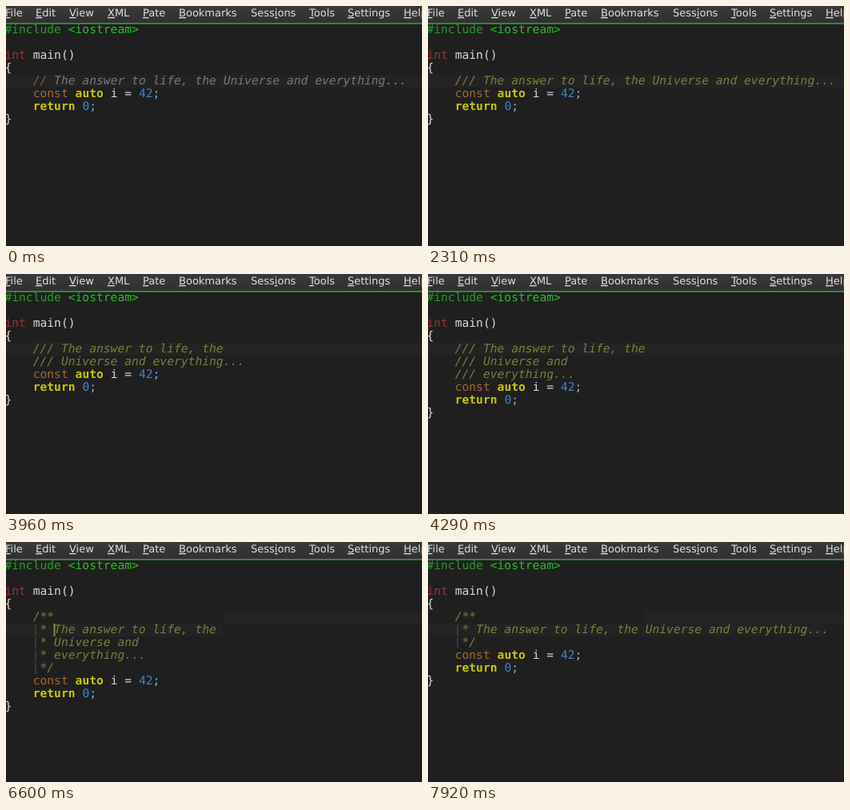
Animation, 520 px wide and 300 px high, one loop 8 s. Source, as an HTML page:

```html
<!DOCTYPE html>
<html lang="en">
<head>
<meta charset="utf-8">
<title>Comment reflow in an editor</title>
<style>
html, body { margin: 0; width: 520px; height: 300px; overflow: hidden; background: #1f1f1f; }
svg { display: block; }
text { white-space: pre; text-rendering: geometricPrecision; }
.menu { font: 13px "DejaVu Sans", sans-serif; fill: #dedede; }
.menu .key { text-decoration: underline; }
.code { font: 14.65px "DejaVu Sans Mono", monospace; fill: #d8d8d8; }
.directive { fill: #299a29; }
.header { fill: #2bbd2b; }
.type { fill: #a03030; }
.qualifier { fill: #a5662c; }
.keyword { fill: #c6c600; font-weight: bold; }
.number { fill: #4383c4; }
.symbol { fill: #78b4ec; }
.comment { fill: #787878; font-style: italic; }
.opener { fill: #80643f; font-style: italic; }
.doc { fill: #7b7e3c; font-style: italic; }
</style>
</head>
<body>
<svg width="520" height="300" viewBox="0 0 520 300">
  <defs>
    <linearGradient id="bar" x2="0" y2="1">
      <stop stop-color="#393939"/>
      <stop offset="1" stop-color="#303030"/>
    </linearGradient>
  </defs>
  <rect width="520" height="300" fill="#1f1f1f"/>
  <rect width="520" height="21" fill="url(#bar)"/>
  <rect y="21" width="520" height="1" fill="#36913a"/>
  <rect y="22" width="520" height="1" fill="#2d7a33"/>
  <g id="menu" class="menu"></g>
  <g id="marks"></g>
  <g id="code" class="code"></g>
</svg>
<script>
const LOOP = 8000, LINE = 16, TOP = 22, LEFT = -1.6;
const FIRST = 4; // line where the comment starts
const $ = id => document.getElementById(id);
const lineTop = n => TOP + n * LINE;
const escapeText = s => s.replace(/&/g, '&amp;').replace(/</g, '&lt;');
const span = (cls, s) => `<tspan class="${cls}">${escapeText(s)}</tspan>`;
const rect = (x, y, w, h, fill) =>
  `<rect x="${x}" y="${y}" width="${w}" height="${h}" fill="${fill}"/>`;

// "_" precedes the shortcut letter
const menu = [[-1, '_File'], [37, '_Edit'], [79, '_View'], [127, '_XML'], [171, '_Pate'],
  [216, '_Bookmarks'], [306, 'Sess_ions'], [379, '_Tools'], [427, '_Settings'], [497, '_Help']];
$('menu').innerHTML = menu.map(([x, label]) =>
  `<text x="${x}" y="13">${label.replace(/_(.)/, '<tspan class="key">$1</tspan>')}</text>`).join('');

const head = [span('directive', '#include ') + span('header', '<iostream>'), '',
  span('type', 'int') + ' main()', '{'];
const tail = [
  '    ' + span('qualifier', 'const') + ' ' + span('keyword', 'auto') + ' i = ' +
    span('number', '42') + span('symbol', ';'),
  '    ' + span('keyword', 'return') + ' ' + span('number', '0') + span('symbol', ';'),
  '}'];

const phrase = 'The answer to life, the Universe and everything...';
// Breaks the phrase before each given word
const wrap = (...words) =>
  words.reduce((s, w) => s.replace(' ' + w, '\n' + w), phrase).split('\n');
const doc = s => span('doc', s);
const slashes = (...words) => wrap(...words).map(s => doc('/// ' + s));
const block = (...words) => ['/**', ...wrap(...words).map(s => ' * ' + s), ' */'].map(doc);

// reach: how far the current-line band has been repainted in block style
const steps = [
  { at: 0, lines: [span('opener', '//') + span('comment', ' ' + phrase)] },
  { at: 990, lines: slashes() },
  { at: 2970, lines: slashes('everything') },
  { at: 3300, lines: slashes('and') },
  { at: 3960, lines: slashes('Universe') },
  { at: 4290, lines: slashes('Universe', 'everything') },
  { at: 5610, lines: block('Universe', 'everything'), reach: 271 },
  { at: 6930, lines: block('and'), reach: 342 },
  { at: 7260, lines: block('everything'), reach: 378 },
  { at: 7920, lines: block(), reach: 497 }
];
const carets = [
  { from: 660, to: 990, x: 50.5, line: 4, fill: '#858585' },
  { from: 990, to: 1320, x: 59.5, line: 4, fill: '#898c45' },
  { from: 1980, to: 2310, x: 59.5, line: 4, fill: '#898c45' },
  { from: 5610, to: 5940, x: 59.5, line: 5, fill: '#898c45' },
  { from: 6600, to: 6930, x: 59.5, line: 5, fill: '#898c45' }
];

function drawCode({ lines }) {
  const comment = lines.map(s => '    ' + s);
  $('code').innerHTML = [...head, ...comment, ...tail].map((s, n) =>
    `<text x="${LEFT}" y="${lineTop(n) + 12}">${s}</text>`).join('');
}

function drawMarks({ lines, reach }, caret) {
  const band = '#232323', y = lineTop(FIRST);
  let marks;
  if (reach) {
    marks = rect(0, y, 520, 1, band) + rect(271, y, 249, LINE, band) +
      rect(0, y + LINE, reach, LINE, band);
    for (let n = 1; n < lines.length; n++)
      marks += rect(36.5, y + n * LINE + 1, 1, LINE - 2, '#505050');
  } else {
    marks = rect(0, y, 520, LINE, band);
  }
  if (caret) marks += rect(caret.x, lineTop(caret.line), 2, LINE, caret.fill);
  $('marks').innerHTML = marks;
}

let shownStep, shownCaret;
function render(t) {
  const step = steps.findLast(s => s.at <= t);
  const caret = carets.find(c => c.from <= t && t < c.to);
  if (step !== shownStep) drawCode(step);
  if (step !== shownStep || caret !== shownCaret) drawMarks(step, caret);
  shownStep = step;
  shownCaret = caret;
}

const start = performance.now();
function tick() {
  render((performance.now() - start) % LOOP);
  requestAnimationFrame(tick);
}
tick();
</script>
</body>
</html>
```
